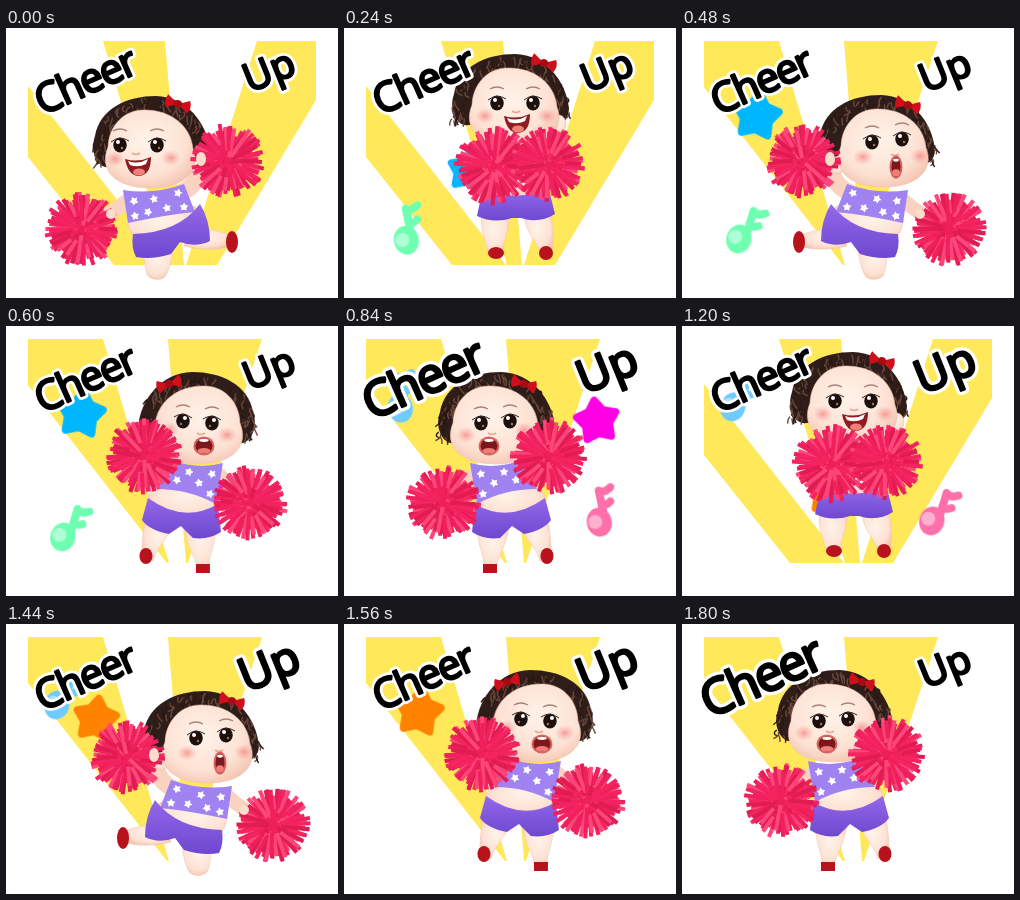
Recreate the animation shown at these times as an HTML page. Size 332x270 px, loop 1.92 s.

```html
<!DOCTYPE html>
<html lang="en">
<head>
<meta charset="utf-8">
<title>Cheer up</title>
<style>
html, body { margin: 0; width: 100%; height: 100%; overflow: hidden; background: #fff; }
svg { display: block; width: 332px; height: 270px; }
text { font-family: "Open Sans", "Noto Sans", sans-serif; text-anchor: middle; stroke-linejoin: round; }
.halo { fill: #fff; stroke: #fff; stroke-width: 8; }
.ink { fill: #000; stroke: #000; stroke-width: 2.4; }
.skin { fill: url(#skin); stroke: #efc3ae; stroke-width: .5; }
.hand { fill: #fcdccb; }
.arm { fill: none; stroke: #f9d3c0; stroke-linecap: round; }
.top { fill: #a083f0; }
.shorts { fill: url(#shorts); }
.shoe { fill: #b8121d; }

.pose, .rays { animation: 960ms step-end infinite; }
.kick { animation-name: kick; }
.step { animation-name: step; }
.hug { animation-name: hug; }
.back { animation-name: back; }
.leap { animation-name: leap; }
.raysA { animation-name: firstHalf; }
.raysB { animation-name: lastHalf; }
@keyframes kick { 0% { visibility: visible } 12.5%, 100% { visibility: hidden } }
@keyframes step { 0%, 25%, 100% { visibility: hidden } 12.5%, 87.5% { visibility: visible } }
@keyframes hug { 0%, 37.5%, 87.5%, 100% { visibility: hidden } 25%, 75% { visibility: visible } }
@keyframes back { 0%, 50%, 75%, 100% { visibility: hidden } 37.5%, 62.5% { visibility: visible } }
@keyframes leap { 0%, 62.5%, 100% { visibility: hidden } 50% { visibility: visible } }
@keyframes firstHalf { 0% { visibility: visible } 50%, 100% { visibility: hidden } }
@keyframes lastHalf { 0% { visibility: hidden } 50%, 100% { visibility: visible } }

.cheer { transform-origin: 79px 52px; animation: cheer 960ms step-end infinite; }
.up { transform-origin: 262px 45px; animation: up 1920ms step-end infinite; }
@keyframes cheer { 0% { transform: none } 75%, 100% { transform: scale(1.2) } }
@keyframes up { 0%, 87.5%, 100% { transform: none } 37.5% { transform: scale(1.18) } }

/* --s is the step of the loop at which the part appears */
.note, .star { animation: life 1920ms step-end infinite; animation-delay: calc((var(--s) - 16) * 120ms); }
.star { animation-name: fly; }
.tilt { animation: tilt 1920ms step-end infinite; }
@keyframes life { 0% { visibility: visible } 37.5%, 100% { visibility: hidden } }
@keyframes tilt {
  0%, 25%, 62.5% { transform: rotate(17deg) }
  6.25%, 43.75%, 81.25%, 100% { transform: rotate(-12deg) }
}
@keyframes fly {
  0% { visibility: visible; transform: translate(145px, 170px) scale(.8) }
  6.25% { visibility: visible; transform: translate(124px, 143px) scale(.85) }
  12.5% { visibility: visible; transform: translate(90px, 95px) scale(.94) }
  18.75% { visibility: visible; transform: translate(75px, 88px) }
  31.25%, 100% { visibility: hidden; transform: translate(75px, 88px) }
}
</style>
</head>
<body>
<svg viewBox="0 0 332 270">
  <defs>
    <radialGradient id="skin" cx=".45" cy=".4" r=".68">
      <stop offset="0" stop-color="#fff3ea"/><stop offset=".65" stop-color="#fde2d4"/><stop offset="1" stop-color="#f2bfab"/>
    </radialGradient>
    <linearGradient id="shorts" x2="0" y2="1">
      <stop offset="0" stop-color="#9468ea"/><stop offset="1" stop-color="#6d48cf"/>
    </linearGradient>
    <radialGradient id="blush">
      <stop offset="0" stop-color="#f58f8c" stop-opacity=".85"/><stop offset="1" stop-color="#f9a79f" stop-opacity="0"/>
    </radialGradient>
    <text id="cheer" x="79" y="67" font-size="41" letter-spacing="-1.5" transform="rotate(-24 79 53)">Cheer</text>
    <text id="up" x="263" y="56" font-size="39" transform="rotate(-22 263 43)">Up</text>
    <g id="note">
      <path d="M4 10V-20Q9 -16 16 -21M4 -6Q8 -3 13 -7" fill="none" stroke="currentColor" stroke-width="8" stroke-linecap="round" stroke-linejoin="round"/>
      <ellipse cx="-2" cy="11" rx="12.5" ry="14.5" fill="currentColor"/>
      <circle cx="-6" cy="10" r="7" fill="#fff" opacity=".45"/>
    </g>
  </defs>

  <g fill="#ffe85a">
    <path class="rays raysA" d="M22 58L162 237H108L22 129ZM97 13H159L178 237H163ZM251 13H310V72L211 237H180Z"/>
    <path class="rays raysB" d="M22 13H97L163 237H161L22 59ZM162 13H256L182 237H180Z"/>
  </g>
  <g id="extras"></g>
  <g id="girl"></g>
  <g class="cheer"><use href="#cheer" class="halo"/><use href="#cheer" class="ink"/></g>
  <g class="up"><use href="#up" class="halo"/><use href="#up" class="ink"/></g>
</svg>
<script>
let seed = 7;
const rnd = (a, b) => {
  seed = (seed * 16807) % 2147483647;
  return a + (b - a) * seed / 2147483647;
};
const f = n => n.toFixed(1);
const polar = (r, a) => `${f(r * Math.cos(a))} ${f(r * Math.sin(a))}`;
const MIRROR = 'transform="translate(343 0) scale(-1 1)"';

const starPath = (r, waist) => 'M' + Array.from({ length: 10 }, (_, i) =>
  polar(i % 2 ? r * waist : r, (i / 5 - .5) * Math.PI)).join('L') + 'Z';

const ellipse = (x, y, rx, ry, attr) => `<ellipse cx="${x}" cy="${y}" rx="${rx}" ry="${ry}" ${attr}/>`;
const shape = (cls, d) => `<path class="${cls}" d="${d}"/>`;
const arm = (w, d) => `<path class="arm" stroke-width="${w}" d="${d}"/>`;
const specks = (...pts) => pts.map(([x, y]) =>
  `<path d="${starPath(4.6, .55)}" fill="#fff" transform="translate(${x} ${y}) rotate(${f(rnd(-30, 30))})"/>`).join('');

function pom(x, y, r = 36) {
  const tones = ['#f3245f', '#e01c52', '#fd4679', '#f0205c'];
  let s = `<circle r="${r * .72}" fill="#ee2059"/>`;
  for (let i = 0; i < 92; i++) {
    const a = i * 2.39996, inner = rnd(3, 18);
    s += `<path d="M${polar(inner, a)}L${polar(r * rnd(.8, 1.06), a + rnd(-.1, .1))}" stroke="${tones[i % 4]}"/>`;
  }
  return `<g transform="translate(${x} ${y})" stroke-width="4">${s}</g>`;
}

function hair(shift) {
  let s = '';
  for (let i = 0; i < 95; i++) {
    const a = rnd(-3.35, .2), r = rnd(.8, 1.02), x = 58 * r * Math.cos(a), y = 3 + 54 * r * Math.sin(a);
    s += `<path d="M${f(x)} ${f(y)}q${f(rnd(-5, 5))} ${f(rnd(1, 5))} ${f(rnd(-5, 5))} ${f(rnd(5, 10))}" stroke="${i % 2 ? '#2a1815' : '#6b483b'}"/>`;
  }
  return `<g transform="translate(${shift} 0)" fill="none" stroke-width="1.4">
    <path fill="#2f1d19" d="M-42 18C-52 20 -62 4 -56 -13C-51 -40 -25 -53 5 -53C36 -52 56 -26 59 1C59 15 48 19 40 15Z"/>${s}</g>`;
}

const eye = ([x, y]) => `<g transform="translate(${x} ${y})">
  ${ellipse(0, 0, 7.5, 7.6, 'fill="#fff"')}${ellipse(0, 0, 6.8, 7.4, 'fill="#1d0f0c"')}
  ${ellipse(-2, -3, 2, 2, 'fill="#fff"')}${ellipse(2, 3, 1.2, 1.2, 'fill="#a9745c"')}
  <path d="M-9 -3Q0 -10 9 -4" stroke="#3b241d" stroke-width="1" fill="none"/>
  <path d="M-7 -14Q0 -18 7 -14" stroke="#a98376" stroke-width="1.4" fill="none"/></g>`;

const smile = `<path d="M-13 -6Q0 -2 13 -8Q13 11 0 11Q-10 10 -13 -6Z" fill="#8e1c20"/>
  <path d="M-10 -4Q0 0 10 -6L8 -1Q0 3 -8 0Z" fill="#fff"/>${ellipse(1, 7, 6, 3.5, 'fill="#f0807c"')}`;
const shout = (rx, ry) => ellipse(0, 0, rx, ry, 'fill="#d9635f"') + ellipse(0, 0, rx - 2, ry - 2, 'fill="#7c181c"') +
  ellipse(0, ry * .5, rx * .6, ry * .3, 'fill="#ee7d79"') + ellipse(0, -ry * .6, rx * .45, 1.6, 'fill="#fff"');

function head(x, y, { eyes, nose, mouth, lips, cheeks, bow, shift = 0, ear = 44, face = 0 }) {
  return `<g transform="translate(${x} ${y})">${hair(shift)}
    ${ellipse(ear, 17, 7, 9, 'class="skin"')}
    <path class="skin" transform="translate(${face} 0)" d="M-43 -2C-42 -25 -25 -40 -6 -39C20 -39 40 -23 42 0C50 20 36 39 0 39C-38 39 -52 20 -43 -2Z"/>
    ${cheeks.map(([a, b]) => ellipse(a, b, 10, 8, 'fill="url(#blush)"')).join('')}
    ${eyes.map(eye).join('')}
    <path d="M${nose[0] - 4} ${nose[1]}q4 3 8 0" fill="none" stroke="#e8a894" stroke-width="1.6"/>
    <g transform="translate(${mouth})">${lips}</g>
    <g transform="translate(${bow}) rotate(15)" fill="#cf0f1b">
      <path d="M0 0L-12 -7Q-15 0 -11 6ZM0 0L11 -6Q15 0 11 7Z"/>${ellipse(0, 0, 4, 4, 'fill="#a90b14"')}</g></g>`;
}

const kickBody = () =>
  arm(17, 'M174 165Q189 160 194 142') + arm(14, 'M124 170Q113 180 102 187') +
  shape('skin', 'M183 200Q204 200 222 206L224 219Q200 224 178 218Z') + ellipse(226, 214, 6, 11, 'class="shoe"') +
  shape('skin', 'M136 222C140 234 138 244 143 249Q152 254 159 249C165 240 166 228 168 216Z') +
  shape('skin', 'M122 188L188 178Q198 184 195 198L134 214Q120 204 122 188Z') +
  shape('top', 'M117 162Q148 167 178 156L189 184Q158 187 122 195Z') +
  shape('shorts', 'M127 206Q172 205 194 176Q204 192 204 213Q190 220 174 214L165 226Q146 232 130 229Q125 220 127 206Z') +
  specks([128, 173], [142, 184], [148, 171], [161, 180], [172, 165], [178, 179], [129, 188]);

const kickPoms = () => pom(76, 201) + pom(222, 133) +
  ellipse(195, 131, 5, 7, 'class="hand"') + ellipse(105, 186, 5, 5, 'class="hand"');

const kick = () => kickBody() + head(145, 121, {
  eyes: [[-31, -4], [6, -4]], nose: [-15, 4], mouth: [-13, 16], lips: smile,
  cheeks: [[-36, 10], [20, 9]], bow: [27, -45]
}) + kickPoms();

const leap = () => `<g ${MIRROR}>${kickBody()}</g>` + head(198, 120, {
  eyes: [[-8, -6], [22, -9]], nose: [15, 6], mouth: [16, 19], lips: shout(6.5, 11.5),
  cheeks: [[-17, 9], [40, 8]], bow: [28, -43], shift: -4, ear: -42, face: 4
}) + `<g ${MIRROR}>${kickPoms()}</g>`;

const hug = () =>
  shape('skin', 'M138 185C135 204 143 214 144 227H158C159 212 165 204 165 188Z') +
  shape('skin', 'M180 188C183 208 194 214 196 225L208 222C211 210 209 196 206 184Z') +
  ellipse(152, 225, 8, 6, 'class="shoe"') + ellipse(202, 225, 7, 7, 'class="shoe"') +
  shape('skin', 'M140 110H204L205 170Q172 178 138 170Z') +
  shape('shorts', 'M138 164Q172 172 205 162L211 186Q195 196 177 190H168Q150 196 133 188Z') +
  head(171, 79, {
    eyes: [[-18, -4], [18, -4]], nose: [1, 4], mouth: [2, 15], lips: smile,
    cheeks: [[-30, 9], [32, 9]], bow: [29, -44], shift: -5
  }) + pom(150, 138, 38) + pom(204, 136);

const step = () =>
  shape('skin', 'M134 203C133 220 141 230 140 242H152C154 230 162 222 165 200Z') +
  shape('skin', 'M178 203C185 218 194 224 196 235L207 231C207 220 207 212 204 194Z') +
  shape('shoe', 'M139 238H153V247H139Z') + ellipse(203, 230, 6.5, 8, 'class="shoe"') +
  arm(15, 'M176 144Q190 150 196 142') + arm(13, 'M130 148Q120 156 116 166') +
  shape('skin', 'M132 166L190 156Q204 168 201 180Q165 198 131 186Z') +
  shape('top', 'M126 137Q150 144 178 134L193 163Q160 163 133 178Z') +
  shape('shorts', 'M131 178Q165 198 201 172L207 194Q200 204 180 208L168 200L156 212Q140 214 128 206Z') +
  specks([137, 148], [150, 157], [160, 146], [172, 154], [139, 168], [184, 150]) +
  head(152, 99, {
    eyes: [[-15, -2], [14, -4]], nose: [-4, 8], mouth: [-7, 21], lips: shout(10.5, 9.5),
    cheeks: [[-30, 10], [28, 5]], bow: [28, -41]
  }) + pom(99, 177) + pom(205, 130, 37);

const poses = { kick, step, hug, back: () => `<g ${MIRROR}>${step()}</g>`, leap };
document.getElementById('girl').innerHTML = Object.entries(poses)
  .map(([name, draw]) => `<g class="pose ${name}">${draw()}</g>`).join('');

const star = (s, color, attr = '') => `<g ${attr}><g class="star" style="--s:${s}">
  <path d="${starPath(22, .6)}" fill="${color}" stroke="${color}" stroke-width="8" stroke-linejoin="round" transform="rotate(8)"/></g></g>`;
const note = (s, color, x, y) => `<g class="note" style="--s:${s};color:${color}">
  <g transform="translate(${x} ${y})"><g class="tilt"><use href="#note"/></g></g></g>`;
document.getElementById('extras').innerHTML =
  note(1, '#6effb1', 62, 201) + note(6, '#ff6fa9', 255, 185) + note(7, '#6fcbff', 56, 71) +
  star(1, '#00b7ff') + star(5, '#ff00e4', MIRROR) + star(10, '#ff8200');
</script>
</body>
</html>
```
